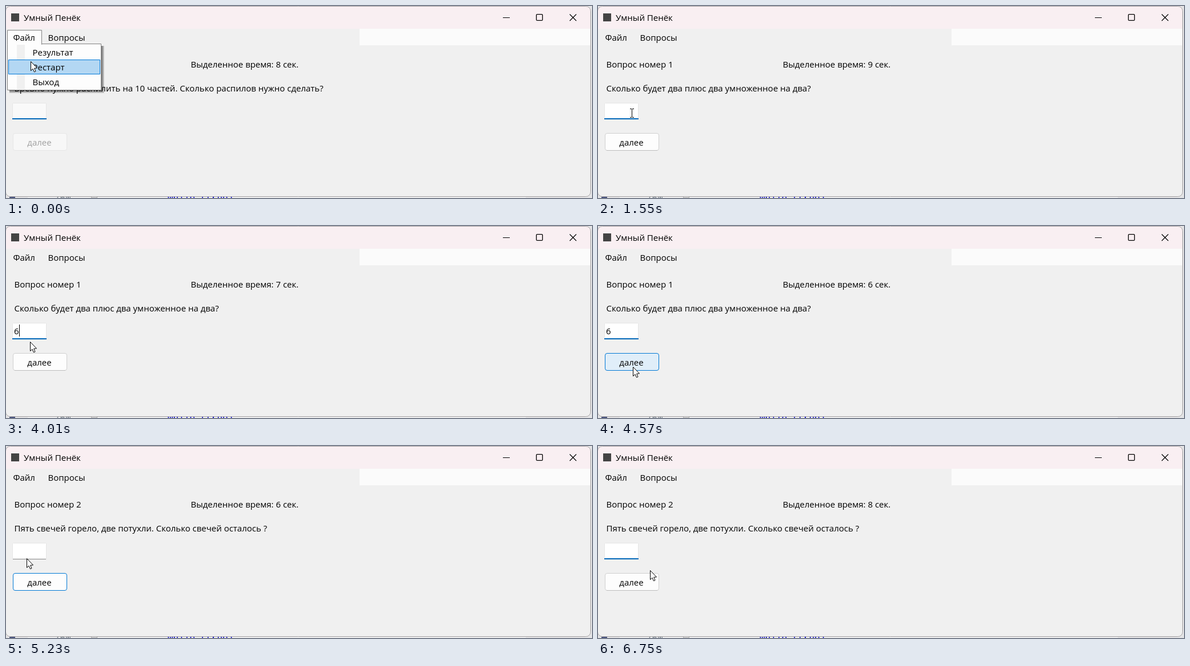
Write an HTML page with a canvas that moves like this. It is 1026 px wide and 337 px high and loops after 6770 ms.

```html
<!DOCTYPE html>
<html lang="ru">
<head>
<meta charset="utf-8">
<title>Умный Пенёк</title>
<style>
  html, body { margin: 0; width: 100%; height: 100%; overflow: hidden; background: #f0f0f0; }
  canvas { display: block; }
</style>
</head>
<body>
<canvas id="stage" width="1026" height="337"></canvas>
<script>
const ctx = document.getElementById('stage').getContext('2d');
const LOOP = 6770;
const UI_FONT = '15px "Open Sans", "Noto Sans", sans-serif';
const CODE_FONT = '16px "Liberation Mono", monospace';

const questions = [
  'Бревно нужно распилить на 10 частей. Сколько распилов нужно сделать?',
  'Сколько будет два плюс два умноженное на два?',
  'Пять свечей горело, две потухли. Сколько свечей осталось ?'
];

const buttonLooks = {
  disabled: { fill: '#f7f7f7', border: '#e6e6e6', text: '#a0a0a0' },
  normal: { fill: '#fdfdfd', border: '#d0d0d0', text: '#000' },
  hover: { fill: '#e0eef9', border: '#0078d4', text: '#000' },
  pressed: { fill: '#cce4f7', border: '#005499', text: '#000' },
  focused: { fill: '#fdfdfd', border: '#0078d4', text: '#000' }
};

const arrow = (x, y) => ({ cursor: 'arrow', x, y });
const beam = (x, y) => ({ cursor: 'beam', x, y });

// Each step lists only what changes at that moment.
const steps = [
  [0, { ...arrow(43, 97), menu: true, question: 0, seconds: 8, button: 'disabled', focus: true, caret: 0, answer: '' }],
  [120, arrow(44, 98)],
  [240, { menu: false, question: 1, button: 'normal' }],
  [360, arrow(50, 101)],
  [480, { caret: 14 }],
  [600, arrow(53, 103)],
  [880, arrow(62, 114)],
  [1160, arrow(62, 150)],
  [1280, { ...beam(57, 178), caret: 0 }],
  [1430, beam(57, 180)],
  [1550, { ...beam(56, 180), seconds: 9 }],
  [1980, { ...beam(55, 180), caret: 14 }],
  [2380, beam(52, 180)],
  [2530, { ...beam(55, 177), caret: 0, seconds: 8 }],
  [2680, beam(52, 177)],
  [3080, { caret: 14 }],
  [3610, { caret: 0, seconds: 7 }],
  [3890, { cursor: '', answer: '6', caret: 23 }],
  [4010, arrow(42, 203)],
  [4130, { ...arrow(46, 227), button: 'hover' }],
  [4280, arrow(59, 247)],
  [4420, arrow(62, 247)],
  [4570, { ...arrow(61, 247), caret: 0, seconds: 6 }],
  [4690, { button: 'pressed', focus: false }],
  [4810, { question: 2, answer: '' }],
  [4940, { button: 'hover' }],
  [5090, arrow(44, 207)],
  [5230, { ...arrow(36, 197), button: 'focused' }],
  [5350, beam(35, 177)],
  [5470, { seconds: 9 }],
  [5770, { focus: true, caret: 14 }],
  [5890, { button: 'normal' }],
  [6190, beam(36, 177)],
  [6340, { caret: 0 }],
  [6460, arrow(48, 200)],
  [6590, { ...arrow(71, 202), seconds: 8 }],
  [6750, arrow(91, 218)]
];

function rect(x, y, w, h, fill) {
  ctx.fillStyle = fill;
  ctx.fillRect(x, y, w, h);
}

function frame(x, y, w, h, stroke, fill, radius = 0) {
  ctx.beginPath();
  ctx.roundRect(x + 0.5, y + 0.5, w - 1, h - 1, radius);
  if (fill) { ctx.fillStyle = fill; ctx.fill(); }
  ctx.strokeStyle = stroke;
  ctx.lineWidth = 1;
  ctx.stroke();
}

function text(str, x, baseline, color = '#000', align = 'left') {
  ctx.font = UI_FONT;
  ctx.textAlign = align;
  ctx.fillStyle = color;
  ctx.fillText(str, x, baseline);
}

function line(color, width, ...points) {
  ctx.beginPath();
  points.forEach(([x, y], i) => i % 2 ? ctx.lineTo(x, y) : ctx.moveTo(x, y));
  ctx.strokeStyle = color;
  ctx.lineWidth = width;
  ctx.stroke();
}

// Sliver of the code editor visible below the window
function drawBackdrop() {
  rect(0, 0, 1026, 337, '#e4e4e6');
  rect(6, 334, 10, 3, '#4a5580');
  rect(38, 334, 872, 3, '#efeff0');
  ctx.font = CODE_FONT;
  ctx.textAlign = 'left';
  ctx.fillStyle = '#76808c';
  ctx.fillText('760', 85, 342);
  ctx.fillStyle = '#0000c0';
  ctx.fillText('while (true)', 283, 342);
  frame(149, 327, 11, 10, '#a5a5a5');
}

function drawWindow() {
  ctx.save();
  ctx.beginPath();
  ctx.roundRect(-1, 0, 1025, 335, 8);
  ctx.clip();
  rect(-1, 0, 1025, 335, '#f0f0f0');
  rect(-1, 0, 1025, 40, '#f9eff2');
  rect(619, 40, 405, 29, '#fbfbfb');
  ctx.restore();
  frame(-1, 0, 1025, 335, '#a3a0a1', null, 8);

  rect(9, 13, 14, 14, '#444');
  text('Умный Пенёк', 31, 26);
  line('#000', 1, [870, 20.5], [882, 20.5]);
  line('#000', 1.2, [987, 14.5], [998.5, 26], [998.5, 14.5], [987, 26]);
  ctx.beginPath();
  ctx.roundRect(928.6, 14.6, 10.8, 10.8, 1.5);
  ctx.lineWidth = 1.3;
  ctx.stroke();
}

function drawForm(s) {
  text('Вопрос номер ' + Math.max(1, s.question), 14.5, 108);
  text(`Выделенное время: ${s.seconds} сек.`, 323.5, 108);
  text(questions[s.question], 14.5, 150);

  frame(11, 170, 60, 29, '#e6e6e6', s.button === 'disabled' ? '#f9f9f9' : '#fff', 1);
  if (s.focus) rect(11, 197, 60, 2, '#0067b8');
  else rect(12, 198, 58, 1, '#868686');
  text(s.answer, 14, 190);
  if (s.caret) rect(s.caret, 173, 1, 21, '#000');

  const look = buttonLooks[s.button];
  frame(12, 223, 95, 31, look.border, look.fill, 3.5);
  if (s.button === 'normal') rect(15, 253, 89, 1, '#bcbcbc');
  text('далее', 58.5, 245, look.text, 'center');
}

function drawMenu(open) {
  if (open) {
    for (let i = 5; i > 0; i--) rect(6, 70, 161 + i, 78 + i, 'rgba(0,0,0,.13)');
    frame(2, 66, 165, 82, '#808080', '#fdfdfd');
    frame(2, 42, 61, 26, '#808080', '#fdfdfd');
    rect(3, 66, 59, 3, '#fdfdfd');
    rect(19, 68, 14, 78, '#f0f0f0');
    frame(4, 94, 161, 26, '#0078d7', '#b3d7f3');
    ['Результат', 'Рестарт', 'Выход'].forEach((item, i) => text(item, 46.5, 87 + i * 26));
  }
  text('Файл', 12.5, 61);
  text('Вопросы', 73.5, 61);
}

function drawCursor({ cursor, x, y }) {
  if (cursor === 'arrow') {
    const outline = [[0, 0], [0, 16], [3.5, 12.8], [6, 18.3], [8.5, 17.2], [6.2, 11.8], [11, 11.5]];
    ctx.beginPath();
    outline.forEach(([dx, dy]) => ctx.lineTo(x + 0.5 + dx, y + 0.5 + dy));
    ctx.closePath();
    ctx.fillStyle = '#fff';
    ctx.fill();
    ctx.strokeStyle = '#000';
    ctx.lineWidth = 1;
    ctx.stroke();
  } else if (cursor === 'beam') {
    rect(x + 3, y + 1, 1, 14, '#000');
    for (const edge of [y, y + 15]) {
      rect(x, edge, 3, 1, '#000');
      rect(x + 4, edge, 3, 1, '#000');
    }
  }
}

function stateAt(time) {
  return Object.assign({}, ...steps.filter(([start]) => start <= time).map(([, change]) => change));
}

function render() {
  const state = stateAt(performance.now() % LOOP);
  drawBackdrop();
  drawWindow();
  drawForm(state);
  drawMenu(state.menu);
  drawCursor(state);
  requestAnimationFrame(render);
}
render();
</script>
</body>
</html>
```
